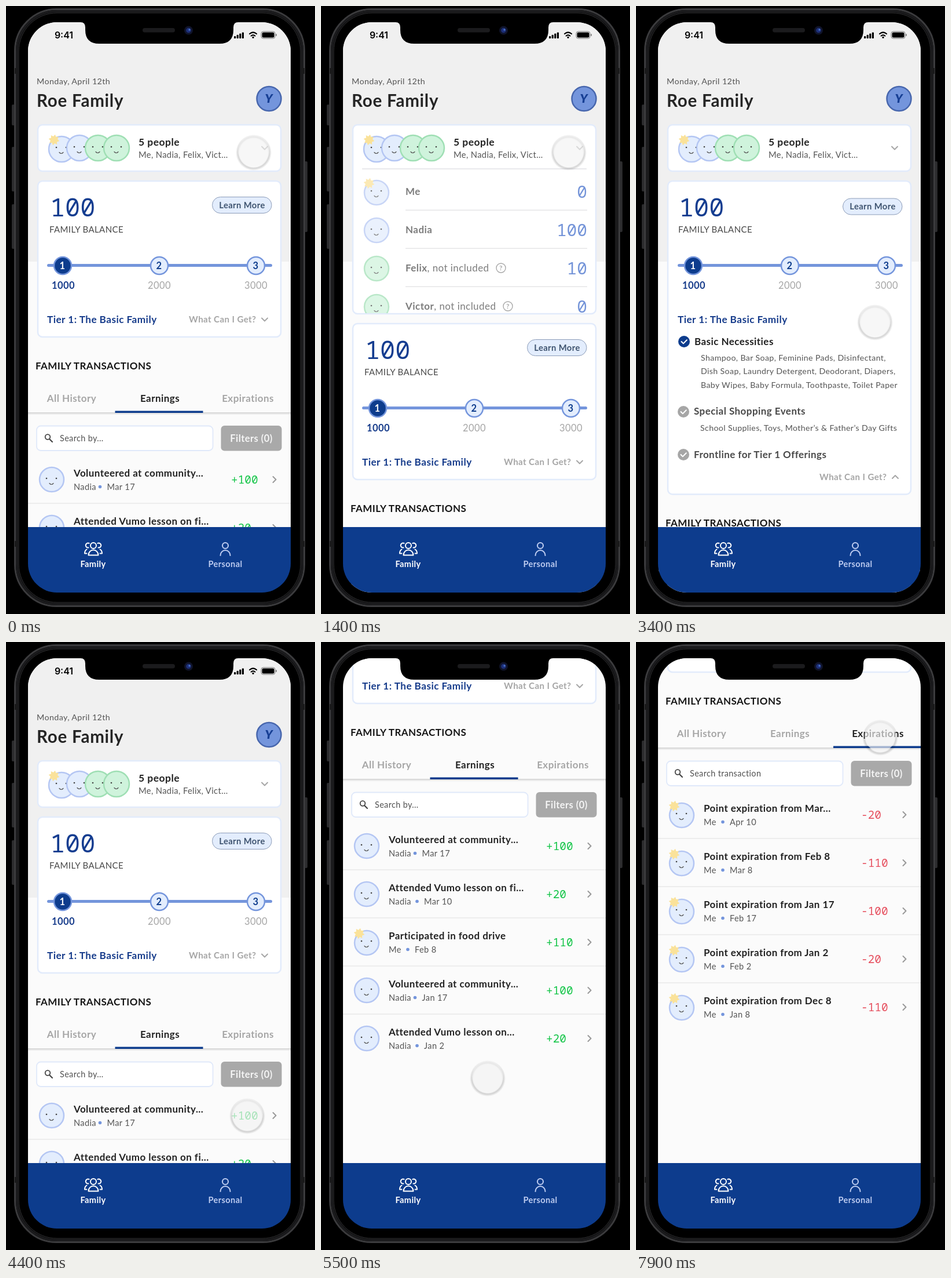
Write an HTML page that moves like this. It is 534 px wide and 1049 px high and loops after 8000 ms.

```html
<!DOCTYPE html>
<html lang="en">
<head>
<meta charset="utf-8">
<title>Family points app</title>
<style>
  html, body { margin: 0; width: 100%; height: 100%; overflow: hidden; background: #000; }
  svg { display: block; width: 100vw; height: 100vh; }
  text { font-family: Lato, "Open Sans", sans-serif; letter-spacing: .026em; white-space: pre; }
  .mono { font-family: "Noto Sans Mono", "DejaVu Sans Mono", monospace; letter-spacing: 0; }
  .status { font-family: Inter, sans-serif; letter-spacing: 0; }
  .line { fill: none; stroke-linecap: round; stroke-linejoin: round; }
  #views { isolation: isolate; }
  #views > g { mix-blend-mode: plus-lighter; }
</style>
</head>
<body>
<svg id="stage" viewBox="0 0 534 1049"></svg>
<script>
const NAVY = '#0d3c8d', INK = '#222', GREY = '#a6a6a6', MID = '#555', ACCENT = '#7495dc';
const PALE = '#e3edfd', EDGE = '#b4c6f3', GREEN = '#14c548', RED = '#e6505f';

// ---- drawing helpers (text is placed by the middle of its capitals) ----
const text = (x, y, str, size, weight = 400, fill = INK, more = '') =>
  `<text x="${x}" y="${y + size * .355}" font-size="${size}" font-weight="${weight}" fill="${fill}" ${more}>${str}</text>`;
const mid = 'text-anchor="middle"', end = 'text-anchor="end"';
const mono = (x, y, str, size, weight, fill, more = '') =>
  text(x, y, str, size, weight, fill, 'class="mono" ' + more);
const rect = (x, y, w, h, fill, r = 0, more = '') =>
  `<rect x="${x}" y="${y}" width="${w}" height="${h}" rx="${r}" fill="${fill}" ${more}/>`;
const circle = (x, y, r, fill, stroke = 'none', width = 0) =>
  `<circle cx="${x}" cy="${y}" r="${r}" fill="${fill}" stroke="${stroke}" stroke-width="${width}"/>`;
const line = (d, stroke, width) => `<path class="line" d="${d}" stroke="${stroke}" stroke-width="${width}"/>`;
const group = (id, body, more = '') => `<g id="${id}" ${more}>${body}</g>`;
const card = (id, y, h) => rect(55, y, 420, h, '#fff', 8, `id="${id}" stroke="#e2ebfb" stroke-width="2.5"`);
const chevron = (x, y, dx, dy) => dx
  ? line(`M${x - 2.5} ${y - 5}l5 5l-5 5`, '#999', 2)
  : line(`M${x - 5} ${y - dy * 2.5}l5 ${dy * 5}l5 ${-dy * 5}`, GREY, 2);

function flower(x, y) {
  const points = Array.from({ length: 16 }, (_, i) => {
    const a = i * Math.PI / 8 + .2, r = i % 2 ? 6.2 : 9.5;
    return `${(x + r * Math.cos(a)).toFixed(1)},${(y + r * Math.sin(a)).toFixed(1)}`;
  });
  return `<polygon points="${points.join(' ')}" fill="#fae29a"/>`;
}

function avatar(x, y, { green = false, crown = false, r = 21 } = {}) {
  const dy = crown ? 1 : 0;
  return circle(x, y + dy, r, green ? '#cff3dc' : PALE, green ? '#9fdfb4' : EDGE, 2.5)
    + circle(x - 9, y - 2, 1.3, '#444') + circle(x + 8, y - 2, 1.3, '#444')
    + line(`M${x - 4} ${y + 6.5}q3.5 4 7 0`, '#555', 1.2)
    + (crown ? flower(x - 13, y - 15) : '');
}

const tick = (x, y, fill) => circle(x, y, 10, fill) + line(`M${x - 4.5} ${y}l3.3 3.4l6-6.2`, '#fff', 2);

// ---- app content ----
const header = text(53, 130, 'Monday, April 12th', 14.3, 400, MID)
  + text(53, 164, 'Roe Family', 29.5, 700, '#252525')
  + circle(454.5, 160, 21, ACCENT, '#4766ad', 2.5)
  + text(454.5, 160, 'Y', 21, 900, '#173f94', mid + ' font-style="italic"');

const statusBar = text(100, 50, '9:41', 16, 600, '#000', 'class="status" ' + mid)
  + [0, 1, 2, 3].map(i => rect(394 + i * 4.6, 52 - i * 2.2, 3.2, 4 + i * 2.2, '#000', 1)).join('')
  + line('M421 48q6-5 12 0M423.7 51.5q3.3-2.8 6.6 0', '#000', 2.2) + circle(427, 54.2, 1.6, '#000')
  + rect(441, 44, 24, 12, 'none', 3.5, 'stroke="#777"') + rect(442.5, 45.5, 21, 9, '#000', 2.2)
  + rect(466.3, 48, 1.6, 4, '#777', .8);

const members = [['Me', 0], ['Nadia', 100], ['Felix', 10, 311], ['Victor', 0, 323], ['Iris', 10, 303]];
const memberRows = members.map(([name, points, help], i) => {
  const y = 320 + 66 * i;
  return avatar(96, y + 1, { green: !!help, crown: !i })
    + text(146, y, name + (help ? '<tspan font-weight="400">, not included</tspan>' : ''), 17, 700, '#4c4c4c')
    + (help ? circle(help, y, 8, 'none', '#888', 1.4) + text(help, y, '?', 12, 700, '#888', mid) : '')
    + mono(460, y + 1, points, 29.5, 500, '#3f6bca', end)
    + (i < 4 ? rect(146, y + 31.5, 314, 1.5, '#dcdcdf') : '');
}).join('');

const familyCard = card('familyBox', 205, 80)
  + avatar(96, 246, { crown: true, r: 22 }) + avatar(127, 245, { r: 22 })
  + avatar(159, 245, { green: true, r: 22 }) + avatar(191, 245, { green: true, r: 22 })
  + text(229, 234.5, '5 people', 17.5, 700)
  + text(229, 256.5, 'Me, Nadia, Felix, Vict...', 14.7, 400, MID)
  + chevron(447, 245, 0, 1)
  + `<g clip-path="url(#familyClip)">${group('members', rect(71, 280, 388, 2, '#e2e2e6') + memberRows)}</g>`;

const steps = [[98, 1000], [265, 2000], [432, 3000]].map(([x, label], i) =>
  circle(x, 448, 15, i ? PALE : NAVY, ACCENT, 2.5)
  + text(x - .5, 448, i + 1, 16.5, 700, i ? NAVY : '#fff', mid)
  + text(x + (i ? 0 : 1), 482, label, 16.5, i ? 400 : 700, i ? GREY : '#173c8b', mid)).join('');

const goods = ['Shampoo, Bar Soap, Feminine Pads, Disinfectant,',
  'Dish Soap, Laundry Detergent, Deodorant, Diapers,',
  'Baby Wipes, Baby Formula, Toothpaste, Toilet Paper'];
const offers = tick(83, 579, NAVY) + text(101, 579, 'Basic Necessities', 17, 700)
  + goods.map((g, i) => text(112, 607 + i * 23.3, g, 14.2, 400, MID)).join('')
  + tick(82, 700, GREY) + text(100, 699, 'Special Shopping Events', 17, 700, '#4a4a4a')
  + text(111, 728, 'School Supplies, Toys, Mother’s &amp; Father’s Day Gifts', 14.2, 400, MID)
  + tick(82, 774, GREY) + text(100, 774, 'Frontline for Tier 1 Offerings', 17, 700, '#4a4a4a');

const balanceCard = card('balanceBox', 302, 269)
  + group('balance', mono(76, 348, '100', 43.5, 450, '#153d90')
    + text(75, 386, 'FAMILY BALANCE', 15, 400, '#484848'))
  + group('learn', rect(356.5, 329.5, 102.5, 28, PALE, 14, 'stroke="#8c9cb8"')
    + text(408, 343.5, 'Learn More', 14.8, 700, '#3f5470', mid))
  + group('tracker', rect(71, 445, 389, 5, ACCENT, 2.5) + steps
    + text(71, 541, 'Tier 1: The Basic Family', 17.2, 700, '#173c8b'))
  + `<g clip-path="url(#offersClip)">${group('offers', offers)}</g>`
  + group('more', text(316, 541, 'What Can I Get?', 15.1, 700, GREY)
    + group('down', chevron(447, 541, 0, 1)) + group('up', chevron(447, 541, 0, -1)));

// ---- transactions ----
const volunteer = 'Volunteered at community...', lesson = 'Attended Vumo lesson on fi...';
const food = 'Participated in food drive', expiry = 'Point expiration from ';
const lost = (from, date, points) => [expiry + from, 'Me', date, -points];
const march17 = [volunteer, 'Nadia', 'Mar 17', 100], march10 = [lesson, 'Nadia', 'Mar 10', 20];
const feb8 = [food, 'Me', 'Feb 8', 110], jan17 = [volunteer, 'Nadia', 'Jan 17', 100];
const lostMar = lost('Mar...', 'Apr 10', 20), lostFeb = lost('Feb 8', 'Mar 8', 110);
const lostJan17 = lost('Jan 17', 'Feb 17', 100), lostJan2 = lost('Jan 2', 'Feb 2', 20);

const tabs = [['All History', 113.5, 38], ['Earnings', 266, 188.5], ['Expirations', 418, 341]];
const views = [
  [1, 'Search by...', [march17, march10, feb8, jan17, ['Attended Vumo lesson on...', 'Nadia', 'Jan 2', 20]]],
  [0, 'Search transaction', [lostMar, march17, march10, lostFeb, lostJan17, feb8, lostJan2, jan17]],
  [2, 'Search transaction', [lostMar, lostFeb, lostJan17, lostJan2, lost('Dec 8', 'Jan 8', 110)]],
];

function transaction([title, who, date, points], i, all) {
  const y = 817 + 83 * i, mine = who === 'Me';
  const dot = mine ? 150 : title[0] === 'A' ? 166 : 162.5;
  return avatar(79, y, { crown: mine })
    + text(117, y - 11.5, title, 17, 700) + text(117, y + 12.5, who, 14.6, 400, MID)
    + circle(dot, y + 12.5, 2.8, ACCENT) + text(dot + 12, y + 12.5, date, 14.6, 400, MID)
    + mono(389, y, (points > 0 ? '+' : '-') + Math.abs(points), 19.4, 500, points > 0 ? GREEN : RED)
    + chevron(464, y, 1, 0)
    + (i < all.length - 1 ? rect(38, y + 40, 454, 2, '#ededed') : '');
}

const viewGroups = views.map(([active, hint, rows], i) => group('view' + i,
  tabs.map(([name, x], k) => text(x, 677, name, 17, 700, k === active ? INK : GREY, mid)).join('')
  + rect(tabs[active][2], 698.5, 152, 3.5, NAVY)
  + text(93, 746, hint, 14.4, 400, '#505050')
  + rows.map(transaction).join(''))).join('');

const transactions = text(51, 620.5, 'FAMILY TRANSACTIONS', 17, 700, '#161616')
  + rect(38, 701, 454, 2, '#d9d9d9') + rect(38, 703, 454, 2, '#ececec')
  + rect(53, 724.5, 304.5, 42.5, '#fff', 7, 'stroke="#e0e9fa" stroke-width="1.8"')
  + line('M75.5 747.5l4.5 4.5', '#444', 2.2) + circle(72, 743.5, 4.3, 'none', '#444', 1.8)
  + rect(371.5, 724, 105, 43.5, '#a9a9a9', 6) + text(424, 746, 'Filters (0)', 16.6, 700, '#f4f4f4', mid)
  + group('views', viewGroups);

const navBar = rect(38, 899, 454, 125, NAVY)
  + circle(151, 931, 5, 'none', '#fff', 2) + line('M142.5 947.5a8.5 9 0 0 1 17 0z', '#fff', 2)
  + line('M143.5 927a4 4 0 1 0-1 7.5M158.5 927a4 4 0 1 1 1 7.5M139.5 937.5q-3.5 2-3.5 7h3.5M162.5 937.5q3.5 2 3.5 7h-3.5', '#fff', 2)
  + text(150.5, 963, 'Family', 14.6, 700, '#fff', mid)
  + circle(379, 931, 5, 'none', '#bccbf0', 2.1) + line('M370.5 948a8.5 9 0 0 1 17 0', '#bccbf0', 2.1)
  + text(379, 963, 'Personal', 14.6, 700, '#bccbf0', mid);

const buttons = [[10, 170, 36], [10, 243, 77], [10, 342, 77], [516, 268, 122]]
  .map(([x, y, h]) => rect(x, y, 5, h, '#2c2c2e', 2)).join('');
const bands = [[15, 107], [511, 107], [15, 923], [511, 923]]
  .map(([x, y]) => rect(x, y, 5, 10, '#1a1a1b')).join('');
const phone = buttons
  + rect(15.5, 5.5, 500, 1030, '#000', 72, 'stroke="#3b3b3d" stroke-width="3"')
  + rect(19, 9, 493, 1023, 'none', 69, 'stroke="#1b1b1d" stroke-width="4"')
  + rect(22, 12, 487, 1017, 'none', 66, 'stroke="#333335"') + bands;
const notch = '<path d="M129 27v1q8 0 8 9v4q0 24 24 24h208q24 0 24-24v-4q0-9 8-9v-1z" fill="#000"/>'
  + rect(236, 38, 56, 7.5, '#1b1b1d', 3.75)
  + circle(315.5, 42, 7.5, '#10142a') + circle(315.5, 42, 4.3, '#1c2f78') + circle(317, 41, 1.7, '#4a70c4');

const clip = (id, x, y, w, h, r = 0) => `<clipPath id="${id}">${rect(x, y, w, h, '#000', r, `id="${id}Box"`)}</clipPath>`;
const shade = (offset, alpha) => `<stop offset="${offset}" stop-opacity="${alpha}"/>`;
const shadow = `<radialGradient id="shadow">${shade(.78, 0)}${shade(.87, .17)}${shade(1, 0)}</radialGradient>`;
const cursor = circle(0, 3, 31, 'url(#shadow)') + circle(0, 0, 27, 'rgba(243,243,243,.66)');

document.getElementById('stage').innerHTML =
  `<defs>${shadow}${clip('screen', 38, 28, 454, 984, 50)}${clip('familyClip', 56, 206, 418, 78)}${clip('offersClip', 56, 560, 418, 10)}</defs>`
  + rect(0, 0, 534, 1049, '#000') + phone
  + `<g clip-path="url(#screen)">${rect(38, 28, 454, 872, '#fbfbfb')}`
  + group('page', rect(38, 0, 454, 441, '#f0f0f0') + statusBar + header + familyCard
    + group('below', balanceCard + group('history', transactions)))
  + navBar + group('cursor', cursor) + '</g>' + notch;

// ---- motion: [time, value, ...] steps, straight lines between ----
const LOOP = 8000, TICK = 100, FAMILY_OPEN = 340, OFFERS_OPEN = 271.5;
const tracks = {
  family: [[200, 0], [300, 60], [400, 218], [500, 312], [600, 340], [1200, 340], [1300, 291],
    [1400, 246], [1500, 150], [1600, 62], [1700, 14], [1800, 0]],
  offers: [[3000, 0], [3100, 40], [3200, 150], [3300, 240], [3400, 271.5], [3900, 271.5],
    [4000, 235], [4100, 140], [4200, 50], [4300, 10], [4400, 0]],
  scroll: [[4800, 0], [4900, 90], [5000, 165], [5100, 220], [5200, 270.5], [5300, 328],
    [5400, 395], [5500, 465], [5600, 505], [5700, 519]],
  tab: [[6300, 0], [6400, .5], [6500, .83], [6600, 1], [7400, 1], [7500, 1.4], [7600, 1.8], [7700, 2]],
  cursor: [[3000, 428, 250], [3100, 413, 543], [3600, 413, 543], [3800, 417, 815], [4400, 417, 815],
    [4600, 288, 750], [5800, 288, 750], [6000, 235, 515], [6200, 122.5, 160], [6900, 122.5, 160],
    [7100, 248, 165], [7300, 422, 162]],
};

function at(track, t) {
  const next = track.findIndex(step => step[0] > t);
  if (next === 0) return track[0].slice(1);
  if (next < 0) return track[track.length - 1].slice(1);
  const [t0, ...a] = track[next - 1], [t1, ...b] = track[next];
  return a.map((v, i) => v + (b[i] - v) * (t - t0) / (t1 - t0));
}

const $ = id => document.getElementById(id);
const move = (id, x, y) => $(id).setAttribute('transform', `translate(${x} ${y})`);
const fade = (id, value) => $(id).setAttribute('opacity', value);
const tall = (id, value) => $(id).setAttribute('height', value);

function draw(t) {
  const [family] = at(tracks.family, t), [offersY] = at(tracks.offers, t);
  const [scroll] = at(tracks.scroll, t), [tab] = at(tracks.tab, t);
  const open = offersY / OFFERS_OPEN;

  move('page', 0, -scroll);
  move('below', 0, family);
  move('history', 0, offersY);
  tall('familyBox', 80 + family);
  tall('familyClipBox', 78 + family);
  fade('members', family / FAMILY_OPEN);

  tall('balanceBox', 269 + offersY);
  tall('offersClipBox', 10 + offersY);
  fade('offers', open);
  move('balance', -2 * open, 0);
  move('learn', open, 2.5 * open);
  move('tracker', open, 0);
  move('more', open, offersY);
  fade('down', 1 - open);
  fade('up', open);

  views.forEach((_, i) => fade('view' + i, Math.max(0, 1 - Math.abs(tab - i))));
  move('cursor', ...at(tracks.cursor, t));
}

function frame() {
  draw(Math.floor(performance.now() % LOOP / TICK) * TICK);
  requestAnimationFrame(frame);
}
frame();
</script>
</body>
</html>
```
